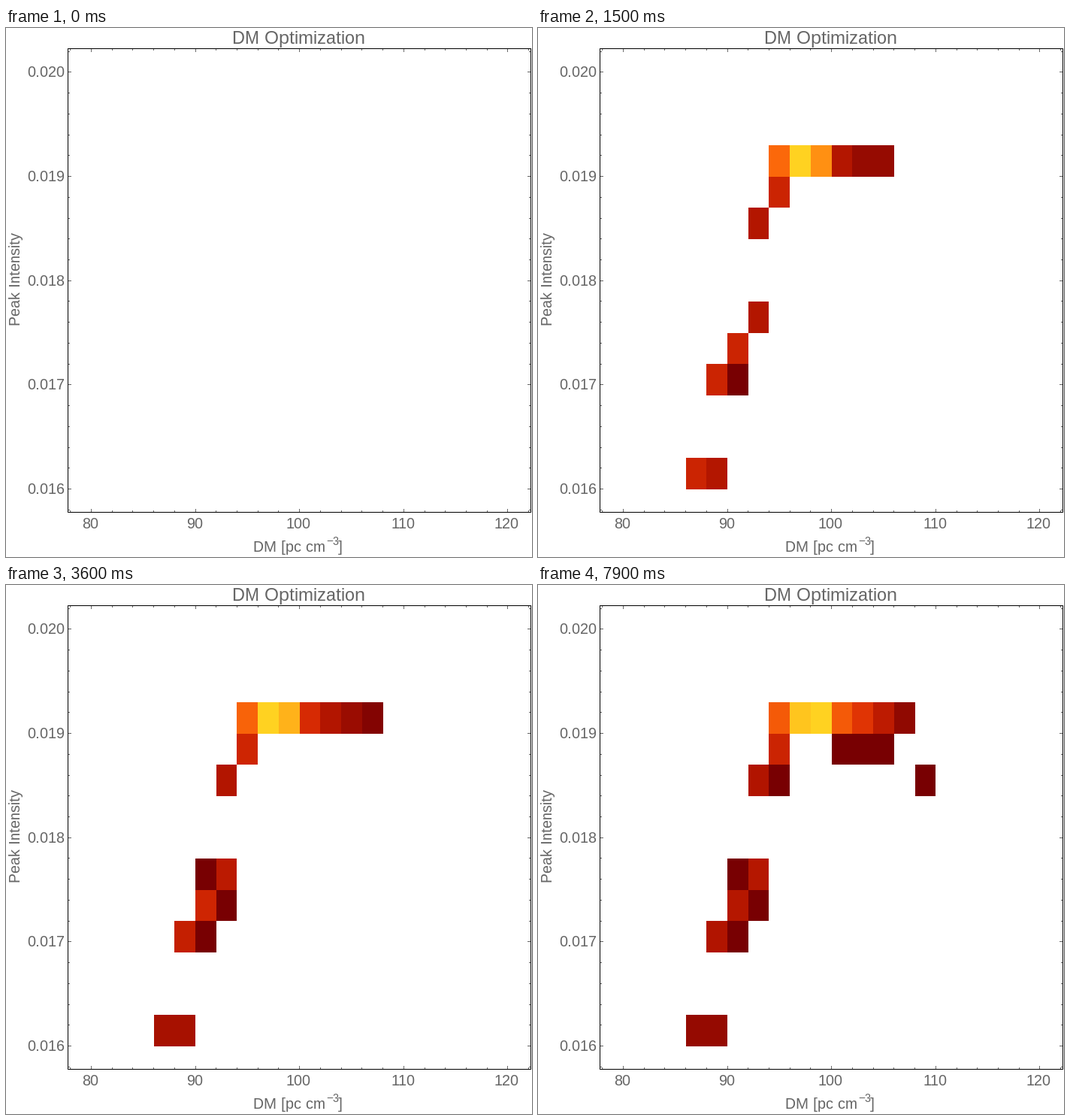
A matplotlib script for the animation above (8 s loop, 700 by 704 pixels).

```python
import math

import numpy as np
import matplotlib.pyplot as plt
from matplotlib.animation import FuncAnimation
from matplotlib.colors import LinearSegmentedColormap
from matplotlib.patches import Rectangle

W, H, DPI = 700, 704, 100
FRAMES, INTERVAL = 80, 100
GRAY = "#666666"
LEFT, TOP, RIGHT, BOTTOM = 82, 27, 698, 644

# Full hinting gives crisp stems and whole-pixel advances.
plt.rcParams.update({"font.family": "Liberation Sans",
                     "text.hinting": "native", "text.hinting_factor": 1})

SOLAR = LinearSegmentedColormap.from_list("solar", [
    (0, "#780002"), (.154, "#b01400"), (.31, "#dc2d03"),
    (.5, "#fb680a"), (.667, "#ff9012"), (1, "#ffd221")])

# Bins are (DM, row), rows counted downwards from the crowded top one.
PLATEAU = range(95, 108, 2)
BRANCH = [(87, 10), (93, 5), (89, 10), (95, 1), (93, 2), (89, 7), (91, 6)]
STRAYS = {(91, 7): 15, (93, 6): 20, (91, 5): 35, (95, 2): 42,
          (109, 2): 50, (105, 1): 52, (103, 1): 53, (101, 1): 64}


def x_of(dm):
    return 390.62 + 13.863 * (dm - 100)


def y_of(row):
    return 197.6 + 41.6 * row


fig = plt.figure(figsize=(W / DPI, H / DPI), dpi=DPI, facecolor="white")
ax = fig.add_axes([0, 0, 1, 1])
ax.set_xlim(0, W)
ax.set_ylim(H, 0)
ax.axis("off")


def box(x, y, w, h, color, z=2):
    return ax.add_patch(Rectangle((x, y), w, h, facecolor=color, linewidth=0,
                                  antialiased=False, zorder=z))


def label(x, y, text, size=20, ha="center", **kwargs):
    ax.text(x, y, text, fontsize=size * 72 / DPI, color=GRAY, ha=ha,
            va="baseline", **kwargs)


def draw_axes():
    for dm in range(78, 123, 2):
        x = round(x_of(dm) - .45)
        size = 5 if dm % 10 == 0 else 3
        box(x, TOP, 1, size, GRAY)
        box(x, BOTTOM + 1 - size, 1, size, GRAY)
        if dm % 10 == 0:
            label(x - .5, 666, str(dm))
    for step in range(-6, 17):
        y = int(197.6 + 27.73 * step)
        size = 5 if step % 5 == 0 else 3
        box(LEFT, y, size, 1, GRAY)
        box(RIGHT + 1 - size, y, size, 1, GRAY)
        if step % 5 == 0:
            label(78, y + 7, f"{0.019 - step * 0.0002:.3f}", ha="right")
    for y in (TOP, BOTTOM):
        box(LEFT, y, RIGHT - LEFT + 1, 1, "black", 3)
    for x in (LEFT, RIGHT):
        box(x, TOP, 1, BOTTOM - TOP + 1, "black", 3)

    label(389.5, 21, "DM Optimization", 24)
    label(19, 334, "Peak Intensity", rotation=90, rotation_mode="anchor")
    label(329, 697, "DM [pc cm", ha="left")
    label(426, 688, "\u22123", 14.5, ha="left")
    label(442, 697, "]", ha="left")


class Bin:
    def __init__(self, dm, row, start, hits):
        self.start, self.hits = start, hits
        # Low DMs fill early, high DMs late.
        self.power = np.interp(dm, [91, 93, 97, 103], [.5, 1, 1, 1.9])
        x0, x1 = round(x_of(dm - 1)), round(x_of(dm + 1))
        y0, y1 = round(y_of(row - 1)), round(y_of(row))
        self.patch = box(x0, y0, x1 - x0, y1 - y0, "white", 1)

    def count(self, frame):
        progress = max(0, frame - self.start) / (FRAMES - 1 - self.start)
        return math.ceil(self.hits * progress ** self.power)


def make_bins():
    for dm in PLATEAU:
        start = math.ceil(1.9 + abs(dm - 98) ** 3 / 48)
        hits = np.interp(dm, [95, 97, 99, 101, 107], [34, 70, 75, 34, 5])
        yield Bin(dm, 0, start, hits)
    for i, (dm, row) in enumerate(BRANCH):
        hits = np.interp(row, [1, 2, 6, 10], [19, 12, 13, 5.5])
        yield Bin(dm, row, round(5 + .2 * i * i), hits)
    for (dm, row), start in STRAYS.items():
        yield Bin(dm, row, start, 0)


draw_axes()
bins = list(make_bins())


def update(frame):
    counts = [b.count(frame) for b in bins]
    peak = max(1, max(counts))
    for b, count in zip(bins, counts):
        b.patch.set_visible(frame >= b.start)
        b.patch.set_facecolor(SOLAR(count / peak))
    return [b.patch for b in bins]


anim = FuncAnimation(fig, update, frames=FRAMES, interval=INTERVAL,
                     repeat=True, repeat_delay=0, blit=False)
plt.show()
```
